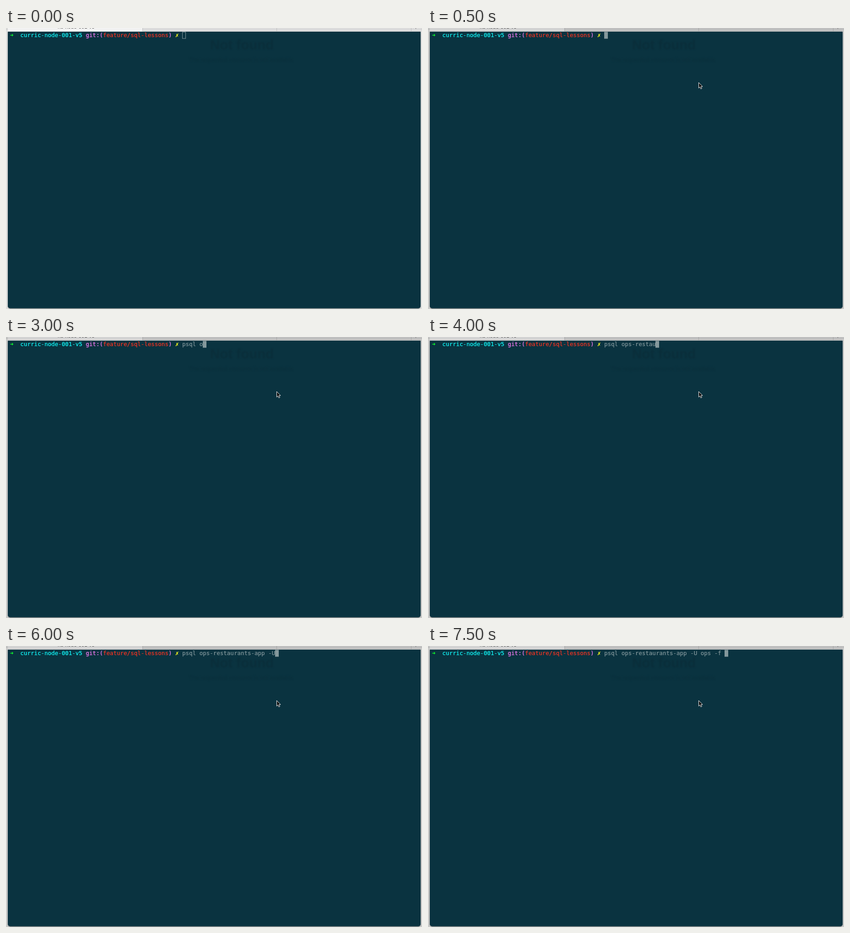
Animation of 909 by 616 pixels, one loop 8 s. Source, as an HTML page with a canvas:

```html
<!DOCTYPE html>
<html lang="en">
<head>
<meta charset="utf-8">
<title>Terminal</title>
<style>
html, body { margin: 0; width: 100%; height: 100%; overflow: hidden; background: #c9cac9; }
canvas { display: block; width: 909px; height: 616px; }
</style>
</head>
<body>
<canvas id="stage" width="909" height="616"></canvas>
<script>
const ctx = document.getElementById('stage').getContext('2d');
const LOOP = 8000, TICK = 250;
const CELL = 7.525, LEFT = 8.75, BASELINE = 20;
const GRAY = '#84989c', PINK = '#ff7bfa';

// pieces of the prompt, laid out one after another
const PROMPT = [
  ['➜  ', '#10fb2c'],
  ['curric-node-001-v5 ', '#10ffff'],
  ['git:(', PINK],
  ['feature/sql-lessons', '#ff3320'],
  [') ', PINK],
  ['✗ ', '#ffff1c']
];

// words typed at a steady pace (characters per second)
const FAST = 9.72, SLOW = 4;
const WORDS = [
  { at: 1440, text: 'psql ', pace: FAST },
  { at: 3000, text: 'ops-restaurants-app', pace: FAST },
  { at: 5250, text: ' ', pace: SLOW },
  { at: 5750, text: '-U ', pace: SLOW },
  { at: 6350, text: 'ops ', pace: FAST },
  { at: 7250, text: '-f ', pace: FAST }
];

function typedText(t) {
  return WORDS
    .filter(word => t >= word.at)
    .map(({ at, text, pace }) => text.slice(0, Math.floor(1 + (t - at) * pace / 1000)))
    .join('');
}

function rect(color, x, y, w, h) {
  ctx.fillStyle = color;
  ctx.fillRect(x, y, w, h);
}

function label(text, x, y, font, color) {
  ctx.font = font + ' "Liberation Sans", sans-serif';
  ctx.fillStyle = color;
  ctx.fillText(text, x, y);
}

// writes text on the character grid and returns the next free column
function write(col, text, color) {
  ctx.font = '12.5px "DejaVu Sans Mono", monospace';
  ctx.fillStyle = ctx.strokeStyle = color;
  ctx.lineWidth = .2;
  for (const ch of text) {
    const x = LEFT + col++ * CELL;
    ctx.fillText(ch, x, BASELINE);
    ctx.strokeText(ch, x, BASELINE);
  }
  return col;
}

function drawTabs(focused) {
  const line = focused ? '#a6a6a6' : '#c0c0c0';
  rect(focused ? '#c9cac9' : '#dedfde', 0, 0, 909, 616);
  rect(focused ? '#bfbfbf' : '#dcdcdc', 4, 0, 902, 8);
  rect(focused ? '#d3d3d3' : '#f3f3f3', 4, 0, 294, 8);
  for (const x of [298, 591, 885]) rect(line, x, 0, 1, 7);
  rect(line, 0, 2, 4, 1);
  rect(line, 906, 2, 3, 1);
  rect('#777', 895, 0, 1, 2);
  label('ns-node-001-v5', 113, 1, '11.5px', '#333');
}

function drawWindow() {
  ctx.save();
  ctx.shadowColor = 'rgba(0,0,0,.4)';
  ctx.shadowBlur = 2;
  ctx.shadowOffsetY = 1;
  ctx.fillStyle = '#0a3340';
  ctx.beginPath();
  ctx.roundRect(4, 8, 902, 606.5, [0, 0, 5, 5]);
  ctx.fill();
  ctx.restore();

  // page faintly showing through the translucent window
  ctx.save();
  ctx.filter = 'blur(1.8px)';
  label('Not found', 446, 47, 'bold 29.5px', '#0a2e3a');
  label('The requested resource is not available', 400, 74, '13px', '#0a2f3b');
  ctx.restore();
}

function drawCursor(col, focused) {
  const x = Math.floor(LEFT + col * CELL);
  if (focused) {
    rect(GRAY, x, 8.5, 8, 15);
  } else {
    ctx.strokeStyle = GRAY;
    ctx.lineWidth = 1;
    ctx.strokeRect(x + .5, 9, 7, 14);
  }
}

function drawPointer() {
  ctx.fillStyle = '#111';
  ctx.strokeStyle = '#eee';
  ctx.lineWidth = 1;
  const arrow = new Path2D('M591.5 119.5v12.3l2.8-2.6 1.8 4.3 2.2-.9-1.8-4.1 3.5-.2z');
  ctx.fill(arrow);
  ctx.stroke(arrow);
}

function draw(t) {
  const focused = t >= 500;
  drawTabs(focused);
  drawWindow();
  let col = 0;
  for (const [text, color] of PROMPT) col = write(col, text, color);
  col = write(col, typedText(t), GRAY);
  drawCursor(col, focused);
  if (t >= 250) drawPointer();
}

const start = performance.now();
function frame() {
  const t = (performance.now() - start) % LOOP;
  draw(Math.floor(t / TICK) * TICK);
  requestAnimationFrame(frame);
}
frame();
</script>
</body>
</html>
```
